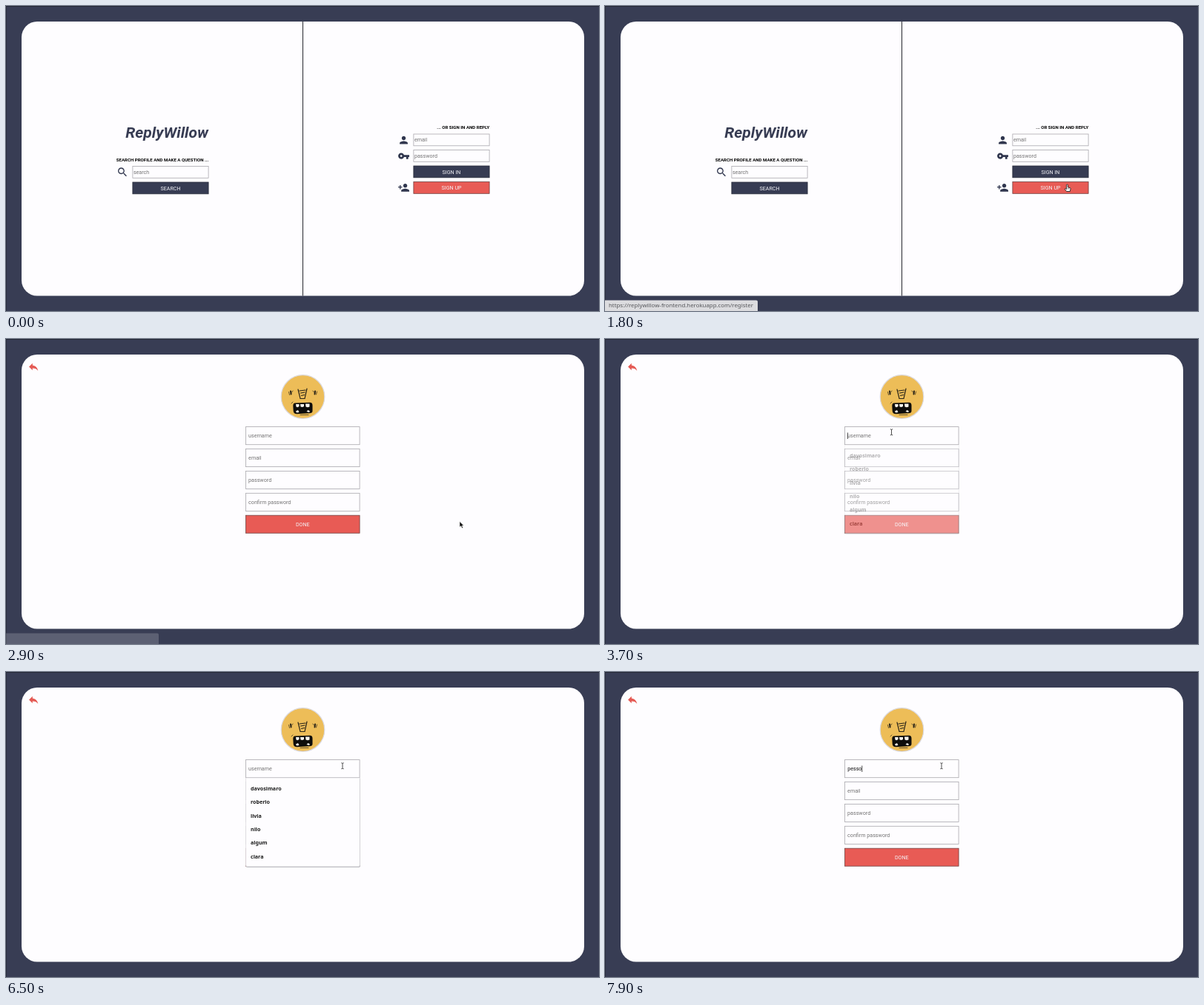
An HTML page for the animation above (8 s loop, 800 by 412 pixels).

```html
<!DOCTYPE html>
<html lang="en">
<head>
<meta charset="utf-8">
<title>Sign-up walkthrough</title>
<style>
html, body { margin: 0; height: 100%; overflow: hidden; background: #383d54 }
svg { display: block; width: 100vw; height: 100vh }
text { font: 7.15px Roboto, Arial, sans-serif; fill: #757575; white-space: pre }
.light { fill: #f4f4f8; text-anchor: middle }
.head { font-size: 6.1px; font-weight: 700; fill: #000; text-anchor: end }
.title { font-size: 21px; font-weight: 700; font-style: italic; fill: #373c53; text-anchor: end }
.status { font: 7.85px "Noto Sans", sans-serif; fill: #55565a }
.item { font: 700 7.1px "Noto Sans", sans-serif; fill: #1c1c1c }
.icon { fill: #30364e }
</style>
</head>
<body>
<svg viewBox="0 0 800 412">
  <rect width="800" height="412" fill="#383d54"/>
  <path d="M0 .5H800M.25 0V412" stroke="#20222e" stroke-width=".8"/>
  <rect x="21" y="21" width="759" height="370.5" rx="21" fill="#fefdff"/>

  <g id="home">
    <path d="M400.5 21V391.5" stroke="#26272d"/>
    <text class="title" x="273" y="177.5">ReplyWillow</text>
    <text class="head" x="273.3" y="209.8">SEARCH PROFILE AND MAKE A QUESTION ...</text>
    <text class="head" x="652.3" y="165.8">... OR SIGN IN AND REPLY</text>
    <g class="icon">
      <path transform="translate(149 216.3) scale(.68)" d="M15.5 14h-.79l-.28-.27C15.41 12.59 16 11.11 16 9.5 16 5.91 13.09 3 9.5 3S3 5.91 3 9.5 5.91 16 9.5 16c1.61 0 3.09-.59 4.23-1.57l.27.28v.79l5 4.99L20.49 19l-4.99-5zm-6 0C7.01 14 5 11.99 5 9.5S7.01 5 9.5 5 14 7.01 14 9.5 11.99 14 9.5 14z"/>
      <path transform="translate(528.4 173) scale(.68)" d="M12 12c2.21 0 4-1.79 4-4s-1.79-4-4-4-4 1.79-4 4 1.79 4 4 4zm0 2c-2.67 0-8 1.34-8 4v2h16v-2c0-2.66-5.33-4-8-4z"/>
      <path transform="translate(528.4 194.4) scale(.68)" d="M12.65 10C11.83 7.67 9.61 6 7 6c-3.31 0-6 2.69-6 6s2.69 6 6 6c2.61 0 4.83-1.67 5.65-4H17v4h4v-4h2v-4H12.65zM7 14c-1.1 0-2-.9-2-2s.9-2 2-2 2 .9 2 2-.9 2-2 2z"/>
      <path transform="translate(528.4 237.2) scale(.68)" d="M15 12c2.21 0 4-1.79 4-4s-1.79-4-4-4-4 1.79-4 4 1.79 4 4 4zm-9-2V7H4v3H1v2h3v3h2v-3h3v-2H6zm9 4c-2.67 0-8 1.34-8 4v2h16v-2c0-2.66-5.33-4-8-4z"/>
    </g>
  </g>

  <g id="register">
    <path transform="translate(29 29.4) scale(.68)" fill="#e55a54" d="M10 9V5l-7 7 7 7v-4.1c5 0 8.5 1.6 11 5.1-1-5-4-10-11-11z"/>
    <circle cx="400.5" cy="78" r="29.3" fill="#edbd58" stroke="#dcdadf" stroke-width="1.2"/>
    <g fill="none" stroke="#2b2519" stroke-linecap="round">
      <path stroke-width="1.2" d="M394 68l3 12.5h6l3-13.5M396 70l8-1M397.5 73l5.5-1M398.5 76.5l4-1"/>
      <path stroke-width="2" d="M384 70.5l.6 4M417 70.5l-.5 4"/>
      <path stroke-width=".7" d="M381.5 71.5l1 4M387 70l-1.5 2M419.5 71l-1 4M414 70l1.5 2M385 87l2-2M397 102.5h11"/>
    </g>
    <path fill="#0e0d0b" d="M390 86.5l20-.8q3.500 0 3.500 4v7.500q0 3-4 3.100l-17 1q-4.500 0-4.800-4l-.4-7q0-3.500 2.700-3.800z"/>
    <path fill="#f6f3ec" d="M391 88h4.500v3q-2 2-4 .5zM397 88h5v3q-2 1.500-4.500.5zM404 87.500h5.500v4q-2.500 1.500-5 0zM391 97.500l3-1.500 1.500 3-3.500.5zM405.500 98l2-2 2.500 1.500-1 1.500z"/>
  </g>

  <g id="menu">
    <path d="M323.500 143.500H478V261.500q0 2.500-2.500 2.500H326q-2.500 0-2.500-2.500z" fill="#b9b9bd"/>
    <path d="M323.500 143H477.300V260.800q0 2-2 2H325.500q-2 0-2-2z" fill="#fefdff" stroke="#dddce0" stroke-width=".6"/>
  </g>
  <text id="typed" x="327.200" y="133.400" style="fill:#111"></text>
  <path id="caret" d="M0 126.500V135" stroke="#222" stroke-width=".8"/>

  <g id="status">
    <path d="M0 397.500H204q2 0 2 2V412H0z" fill="#dcdcdf"/>
    <text id="link" class="status" x="5" y="407.300">https://replywillow-frontend.herokuapp.com/register</text>
  </g>

  <g id="arrow"><path d="M0 0V7.500L1.800 6 3.200 9 4.500 8.400 3.200 5.500H5.500z" fill="#111" stroke="#fff" stroke-width=".5"/></g>
  <g id="hand"><path d="M-.9 0Q0-.8.9 0V3.400L4 4.200Q4.800 4.500 4.600 5.500L3.800 9H-.8L-3.300 5.800Q-3 4.800-2 5.300L-.9 6.200z" fill="#fff" stroke="#111" stroke-width=".8"/><path d="M1 4.500V6M2.500 4.700V6" stroke="#111" stroke-width=".5"/></g>
  <g id="beam"><path d="M-1.700-4Q0-4 0-3.200 0-4 1.700-4M0-3.200V3.200M-1.700 4Q0 4 0 3.200 0 4 1.700 4" fill="none" stroke="#222" stroke-width=".8"/></g>
</svg>
<script>
const $ = id => document.getElementById(id);
const show = (id, on) => $(id).style.display = on ? '' : 'none';

function add(parent, tag, attrs, label = '') {
  const el = document.createElementNS('http://www.w3.org/2000/svg', tag);
  for (const key in attrs) el.setAttribute(key, attrs[key]);
  el.textContent = label;
  $(parent).append(el);
  return el;
}

function box(parent, x, y, width, height, fill, stroke) {
  add(parent, 'rect', { x, y, width, height, fill, stroke, 'stroke-width': .8 });
}

function field(parent, x, y, w, h, pad, label) {
  box(parent, x, y, w, h, '#fefdff', '#aaa9ad');
  return add(parent, 'text', { x: x + pad, y: y + h / 2 + 2.4 }, label);
}

function button(parent, x, y, w, h, label, fill, stroke) {
  box(parent, x, y, w, h, fill, stroke);
  add(parent, 'text', { class: 'light', x: x + w / 2, y: y + h / 2 + 2.6 }, label);
}

const navy = ['#373c53', '#292c3b'], red = ['#e85b55', '#704040'];
field('home', 170.9, 216.5, 102.2, 15.8, 1, 'search');
button('home', 170.9, 238, 102.2, 15.8, 'SEARCH', ...navy);
field('home', 549.9, 173, 102.2, 15.8, 1, 'email');
field('home', 549.9, 194.5, 102.2, 15.8, 1, 'password');
button('home', 549.9, 216, 102.2, 15.8, 'SIGN IN', ...navy);
button('home', 549.9, 237.500, 102.2, 15.8, 'SIGN UP', ...red);

const hint = ['username', 'email', 'password', 'confirm password']
  .map((label, i) => field('register', 323.5, 118.6 + i * 29.9, 153.6, 24.1, 3.6, label))[0];
button('register', 323.5, 238.2, 153.6, 24, 'DONE', ...red);

['davosimaro', 'roberio', 'livia', 'nilo', 'algum', 'clara'].forEach((name, i) =>
  add('menu', 'text', { class: 'item', x: 330, y: 159.6 + i * 18.45 }, name));

// Pointer stops: time, x, y
const stops = [
  [700, 430, 200], [1100, 361, 158.6], [1200, 361, 158.6], [1700, 623.5, 241.500],
  [2400, 623.5, 241.5], [2600, 612, 246.600], [2900, 612, 246.6], [3500, 386.5, 125.8],
  [5700, 386.5, 125.8], [6200, 485, 125], [6300, 485, 125], [6500, 454, 126.8], [8000, 454, 126.8]
];

function pointer(t) {
  const i = Math.max(1, stops.findIndex(s => s[0] >= t));
  const [t0, x0, y0] = stops[i - 1], [t1, x1, y1] = stops[i];
  const u = Math.min(1, Math.max(0, (t - t0) / (t1 - t0))), e = u * u * (3 - 2 * u);
  return [x0 + (x1 - x0) * e, y0 + (y1 - y0) * e];
}

const inside = (x, y, l, t, r, b) => x > l && x < r && y > t && y < b;

function draw(now) {
  const t = Math.floor(now % 8000 / 100) * 100;
  const home = t < 2900, typing = t >= 7600;

  show('home', home);
  show('register', !home);
  show('status', t >= 1700 && t < 3000);
  $('status').style.opacity = home ? 1 : .22;
  show('link', home);

  show('menu', t >= 3700 && !typing);
  $('menu').style.opacity = Math.min(1, (t - 3600) / 300);

  const word = typing ? 'pesso'.slice(0, [1, 2, 3, 5][(t - 7600) / 100]) : '';
  $('typed').textContent = word;
  hint.style.display = typing ? 'none' : '';
  const blink = t < 3800 || Math.floor((t - 3800) / 300) % 2 === 0;
  show('caret', t >= 3700 && (typing || blink));
  const end = word ? $('typed').getComputedTextLength() : 0;
  $('caret').setAttribute('transform', `translate(${327.5 + end} 0)`);

  const [x, y] = pointer(t);
  const kind = home
    ? inside(x, y, 549, 216, 653, 254) ? 'hand' : 'arrow'
    : inside(x, y, 323, 118, 478, 233) ? 'beam' : 'arrow';
  for (const id of ['arrow', 'hand', 'beam']) {
    show(id, id === kind && t >= 700);
    $(id).setAttribute('transform', `translate(${x} ${y})`);
  }
}

const start = performance.now();
function tick() {
  draw(performance.now() - start);
  requestAnimationFrame(tick);
}
tick();
</script>
</body>
</html>
```
